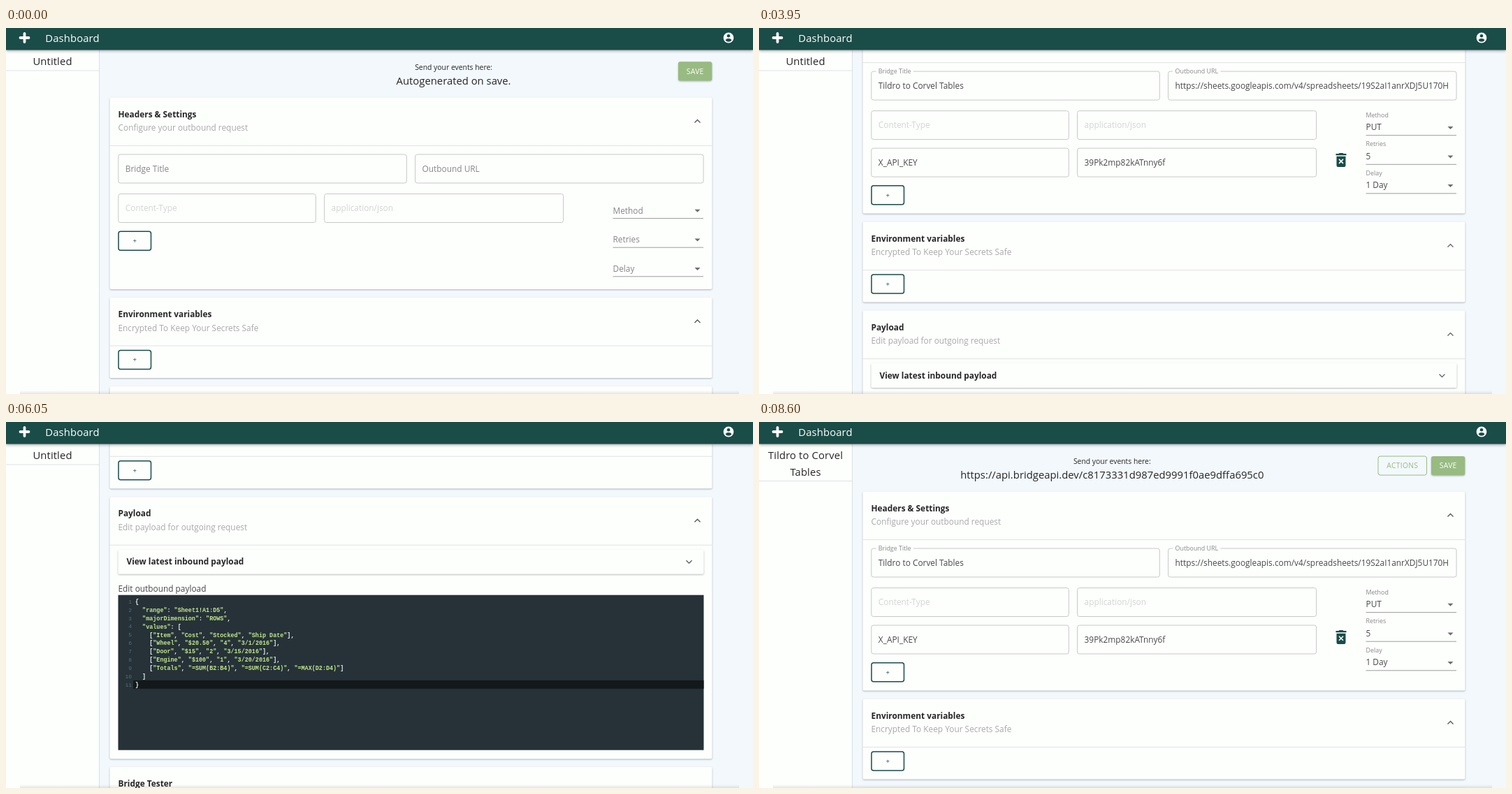
These frames come from a looping animation (1069 px wide and 524 px high, 9850 ms). An HTML page:

```html
<!DOCTYPE html>
<html lang="en">
<head>
<meta charset="utf-8">
<title>Bridge editor</title>
<style>
  html, body { margin: 0; width: 100%; height: 100%; overflow: hidden; background: #f3f8fc; }
  svg { display: block; width: 100%; height: 100%; }
  text { font-family: "Open Sans", sans-serif; white-space: pre; }
  .code { font-family: "Liberation Mono", monospace; font-weight: 700; }
  .paper { fill: #fdfffd; filter: drop-shadow(0 1px 1px rgba(0, 0, 0, .28)); }
  .notch { paint-order: stroke; stroke: #fdfffd; stroke-width: 8px; stroke-linejoin: round; }
</style>
</head>
<body>
<svg id="stage" viewBox="0 0 1069 524"></svg>
<script>
const LOOP = 9850;
const TEAL = '#1a4c48', GREEN = '#98bb82', PAPER = '#fdfffd';
const INK = '#484848', DARK = '#262626', GREY = '#868686', PALE = '#a9a9a9', FAINT = '#d3d5d3', EDGE = '#c6c9c6';
const BODY = 11.87, SMALL = 8.9, LARGE = 14.84, BUTTON = 10.39;
const TITLE = ['Tildro to Corvel', 'Tables'];
const TARGET = 'https://sheets.googleapis.com/v4/spreadsheets/19S2aI1anrXDJ5U170H';
const ENDPOINT = 'https://api.bridgeapi.dev/c8173331d987ed9991f0ae9dffa695c0';

const SAMPLE = `{
  "hello": "world",
  "accessPayload": "$payload.message",
  "accessNestedPayload": "$payload.nested.message"
}`.split('\n');

const SHEET = `{
  "range": "Sheet1!A1:D5",
  "majorDimension": "ROWS",
  "values": [
    ["Item", "Cost", "Stocked", "Ship Date"],
    ["Wheel", "$20.50", "4", "3/1/2016"],
    ["Door", "$15", "2", "3/15/2016"],
    ["Engine", "$100", "1", "3/20/2016"],
    ["Totals", "=SUM(B2:B4)", "=SUM(C2:C4)", "=MAX(D2:D4)"]
  ]
}`.split('\n');

// y is the middle of the capital letters
const text = (x, y, str, size, fill, more = '') =>
  `<text x="${x}" y="${y + size * .36}" font-size="${size}" fill="${fill}" ${more}>${str}</text>`;
const middle = 'text-anchor="middle"';
const rect = (x, y, w, h, fill, more = '') =>
  `<rect x="${x}" y="${y}" width="${w}" height="${h}" fill="${fill}" ${more}/>`;
const line = (x1, y, x2, color, width = 1, more = '') =>
  `<path d="M${x1} ${y}H${x2}" stroke="${color}" stroke-width="${width}" ${more}/>`;
const paper = (x, y, w, h) => rect(x, y, w, h, PAPER, 'class="paper" rx="2"');
const chevron = (x, y, dir) =>
  `<path d="M${x - 4} ${y + 2 * dir}l4 ${-4 * dir}l4 ${4 * dir}" fill="none" stroke="#555" stroke-width="1.3"/>`;

function card(y, bottom, title, subtitle) {
  return paper(148.5, y, 862, bottom - y)
    + text(160.5, y + 24, title, BODY, DARK, 'font-weight="700"')
    + text(160.5, y + 43.5, subtitle, BODY, PALE)
    + chevron(989.5, y + 34, 1)
    + line(148.5, y + 69, 1010.5, '#e0e3e1');
}

function outline(x, y, w, focus) {
  return rect(x, y, w, 41, 'none', `rx="3" stroke="${focus ? TEAL : EDGE}" stroke-width="${focus ? 1.6 : 1}"`);
}

function field(x, y, w, label, value, focus) {
  const inner = value
    ? text(x + 10, y, label, SMALL, focus ? TEAL : GREY, 'class="notch"') + text(x + 10, y + 20.5, value, BODY, INK)
    : text(x + 10, y + 20.5, label, BODY, GREY);
  return outline(x, y, w, focus) + inner;
}

const plainField = (x, y, w, value, color, focus) =>
  outline(x, y, w, focus) + text(x + 10, y + 20.5, value, BODY, color);

function select(y, label, value, focus) {
  return (value
    ? text(868.5, y - 18, label, SMALL, focus ? TEAL : GREY) + text(868.5, y - .5, value, BODY, INK)
    : text(868.5, y, label, BODY, GREY))
    + `<path d="M985.5 ${y - 1.5}h8l-4 4z" fill="#6d6d6d"/>`
    + line(868.5, y + 11.3, 998, focus ? TEAL : '#9b9d9b', focus ? 1.5 : 1);
}

const addButton = y =>
  rect(161, y - 13.5, 46.5, 27, 'none', `rx="3" stroke="${TEAL}" stroke-width="1.5"`)
  + text(184.2, y, '+', 9.5, TEAL, middle);

const trash = (x, y) =>
  `<g transform="translate(${x} ${y})" fill="${TEAL}"><path d="M-7.5-9h4l1-1h5l1 1h4v2.2h-15z"/>`
  + `<path d="M-6.5-5.3h13v13q0 2.2-2.2 2.2h-8.600q-2.200 0-2.200-2.200z"/>`
  + `<path d="M-3-1.200l6 6m0-6l-6 6" stroke="${PAPER}" stroke-width="1.600"/></g>`;

function editor(y, lines, matched) {
  const pitch = BODY, size = 8.44;
  let out = rect(160.5, y, 838, 222, '#263238');
  out += rect(182, y + 3.5 + pitch * (lines.length - 1), 816.5, pitch, '#13181a');
  lines.forEach((row, i) => {
    const mid = y + 9.3 + i * pitch;
    const colored = row.replace(/"[^"]*"/g, s => `<tspan fill="#c3e88d">${s}</tspan>`);
    const mark = matched && row.length === 1 ? ' text-decoration="underline"' : '';
    out += text(180, mid, i + 1, 8, '#546e7a', 'class="code" style="font-weight:400" text-anchor="end"')
      + text(185, mid, colored, size, '#e9f5f3', 'class="code"' + mark);
  });
  return out;
}

function heading(saved) {
  const x = saved ? 505.3 : 640.6, y = saved ? 49 : 48.3;
  let out = text(x, 56.5, 'Send your events here:', BUTTON, DARK, middle)
    + text(x, 75.5, saved ? ENDPOINT : 'Autogenerated on save.', LARGE, DARK, middle)
    + rect(962, y, 48.3, 27.2, GREEN, 'rx="3" style="filter:drop-shadow(0 1px 1px rgba(0,0,0,.28))"');
  const label = (cx, str, color) =>
    text(cx, y + 13.6, str, BUTTON, color, middle + ' font-weight="500" letter-spacing=".25"');
  out += label(986.2, 'SAVE', '#fff');
  if (saved) {
    out += rect(886, 49, 69.5, 27, 'none', `rx="3" stroke="${GREEN}"`) + label(920.8, 'ACTIONS', GREEN);
  }
  return out;
}

function page(t) {
  const during = (a, b) => t >= a && t < b;
  const row = t >= 2650, shift = row ? 10.5 : 0;
  let out = heading(t >= 8600)
    + card(99.5, 374 + shift, 'Headers &amp; Settings', 'Configure your outbound request')
    + field(160.8, 181, 412.5, 'Bridge Title', t >= 750 && TITLE.join(' '), during(750, 1250))
    + field(585.6, 181, 412.5, 'Outbound URL', t >= 1250 && TARGET, during(1250, 1750))
    + plainField(160.8, 237.5, 282.5, 'Content-Type', FAINT)
    + plainField(455.6, 237.5, 342, 'application/json', FAINT)
    + select(261.3, 'Method', t >= 1750 && 'PUT', during(1750, 2050))
    + select(302.9, 'Retries', t >= 2050 && '5', during(2050, 2350))
    + select(344.5, 'Delay', t >= 2350 && '1 Day', during(2350, 2650))
    + addButton(row ? 358.2 : 304.8);
  if (row) {
    const typing = during(3150, 3650);
    out += plainField(160.8, 291, 282.5, 'X_API_KEY', INK, during(2650, 3150))
      + plainField(455.6, 291, 342, t >= 3150 ? '39Pk2mp82kATnny6f' : '', INK, typing)
      + trash(833, 308);
    if (typing) out += line(466, 318.6, 582, '#e8403a', 1.4, 'stroke-dasharray="1.5 1.5"');
  }
  out += `<g transform="translate(0 ${shift - 10.5})">`
    + card(396.5, 511.5, 'Environment variables', 'Encrypted To Keep Your Secrets Safe')
    + addButton(485.5)
    + card(523.5, 898.5, 'Payload', 'Edit payload for outgoing request')
    + paper(160.5, 599, 838, 35)
    + text(172.5, 616.5, 'View latest inbound payload', BODY, DARK, 'font-weight="700"')
    + chevron(977.5, 616.5, -1)
    + text(160.5, 655, 'Edit outbound payload', BODY, INK)
    + editor(664, t < 5550 ? SAMPLE : SHEET, t < 5550)
    + card(910, 1100, 'Bridge Tester', '')
    + '</g>';
  return out;
}

function chrome(saved) {
  const rows = saved ? TITLE : ['Untitled'];
  const side = rows.map((s, i) =>
    text(66.5, 48 + i * 24, s, LARGE, DARK, middle + ' font-weight="500" letter-spacing=".11"')).join('');
  return rect(0, 0, 133, 524, PAPER) + rect(133, 0, 1, 524, '#d9e0e2')
    + side + line(0, saved ? 84.5 : 61, 133, '#dde1df')
    + rect(0, 0, 1069, 31.5, TEAL, 'style="filter:drop-shadow(0 1.5px 2px rgba(0,0,0,.4))"')
    + '<path d="M20.500 14h12M26.500 8v12" stroke="#fff" stroke-width="3.800" stroke-linecap="round"/>'
    + text(56.3, 14.2, 'Dashboard', LARGE, '#fff', 'letter-spacing=".11"')
    + '<circle cx="1034" cy="14" r="7.400" fill="#fff"/>'
    + `<circle cx="1034" cy="11.300" r="2.300" fill="${TEAL}"/>`
    + `<path d="M1029.500 17.500q1-2.400 4.500-2.400t4.500 2.400q-1.600 2.200-4.500 2.200t-4.500-2.200z" fill="${TEAL}"/>`
    + '<defs><linearGradient id="fade" x2="0" y2="1"><stop stop-opacity="0"/><stop offset="1" stop-opacity=".1"/></linearGradient></defs>'
    + rect(20, 519, 1029, 5, 'url(#fade)');
}

// Scrolling advances in even steps, ten per second
const steps = (t, start, max) => Math.min(max, Math.max(0, Math.floor((t - start) / 100) + 1));
const scrollAt = t => Math.max(0, 446 / 15 * steps(t, 3650, 15) - 29.7 * steps(t, 6050, 16));

const stage = document.getElementById('stage');
const begin = performance.now();
let shown = '';

function frame() {
  const t = Math.max(0, performance.now() - begin) % LOOP;
  const markup = rect(0, 0, 1069, 524, '#f3f8fc')
    + `<g transform="translate(0 ${-scrollAt(t).toFixed(1)})">${page(t)}</g>` + chrome(t >= 8600);
  if (markup !== shown) stage.innerHTML = shown = markup;
  requestAnimationFrame(frame);
}
frame();
</script>
</body>
</html>
```
